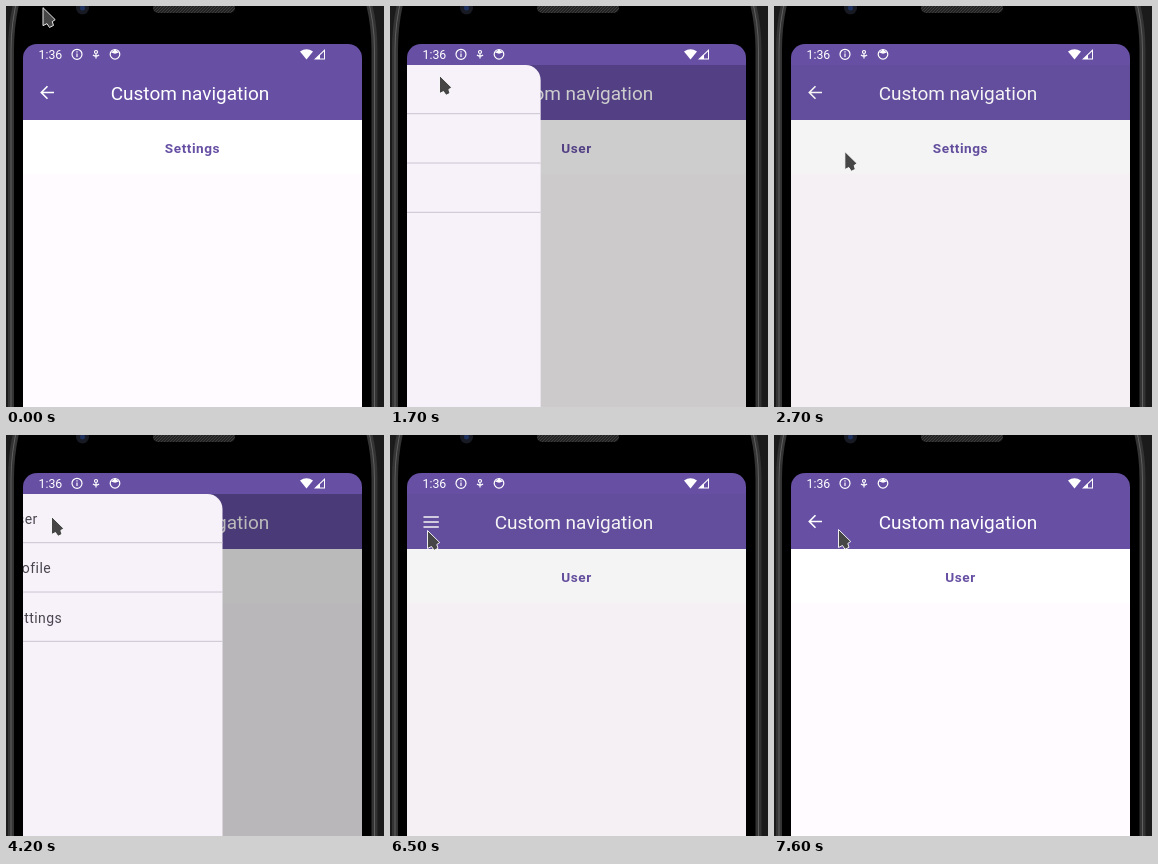
Recreate the animation shown at these times as an HTML page. Size 378 px wide and 401 px high, loop 8000 ms.

```html
<!DOCTYPE html>
<html lang="en">
<head>
<meta charset="utf-8">
<title>Custom navigation</title>
<style>
html, body { margin: 0; width: 100%; height: 100%; overflow: hidden; background: #000; }
svg { display: block; width: 378px; height: 401px; font-family: Roboto, sans-serif; }
</style>
</head>
<body>
<svg viewBox="0 0 378 401" xmlns="http://www.w3.org/2000/svg">
  <defs>
    <clipPath id="screen"><path d="M17 401V52a14 14 0 0 1 14-14H342a14 14 0 0 1 14 14V401Z"/></clipPath>
    <clipPath id="app"><rect x="17" y="59" width="339" height="342"/></clipPath>
    <pattern id="mesh" width="3" height="3" patternUnits="userSpaceOnUse">
      <rect width="3" height="3" fill="#222"/><path d="M0 3L3 0" stroke="#444" stroke-width=".8"/>
    </pattern>
    <path id="edge" d="M5 410V44Q5 16 12-10H361Q368.500 16 368.500 44V410"/>
  </defs>

  <rect width="378" height="401" fill="#1b1b1b"/>
  <use href="#edge" fill="#000" stroke="#343434" stroke-width="6"/>
  <use href="#edge" fill="none" stroke="#606060"/>
  <rect x="147" y="-8" width="82" height="15" rx="5" fill="url(#mesh)"/>
  <circle cx="76.500" cy="2" r="6.500" fill="#171a22"/>
  <circle cx="76.500" cy="2" r="2.500" fill="#1d2f5c"/>

  <g clip-path="url(#screen)">
    <rect x="17" y="38" width="339" height="76" fill="#6750a4"/>
    <rect x="17" y="114" width="339" height="54" fill="#fff"/>
    <rect x="17" y="168" width="339" height="233" fill="#fffbfe"/>

    <g fill="none" stroke="#fff" stroke-width="1.200">
      <text x="32.500" y="53" font-size="12.300" fill="#fff" stroke="none">1:36</text>
      <circle cx="71" cy="48.300" r="5"/>
      <path d="M71 47.500V51M71 45.300V46.500"/>
      <circle cx="90" cy="46" r="1.500"/>
      <path d="M87 49Q90 51.500 93 49M90 48V52.500"/>
      <circle cx="109" cy="48.300" r="4.800"/>
      <path d="M105 46.500L109 43.500L113 46.500L109 47.800Z" fill="#fff" stroke="none"/>
      <path d="M294 45.600Q300.500 40.700 307 45.600L300.500 53.500ZM308 53.500L319 43V53.500Z" fill="#fff" stroke="none"/>
      <path d="M314 52.500V49.300L318 45.500V52.500Z" fill="#6750a4" stroke="none"/>
    </g>

    <text x="184" y="94" font-size="19" fill="#fff" text-anchor="middle">Custom navigation</text>
    <path id="icon" fill="none" stroke="#fff" stroke-width="1.600"/>
    <text id="label" x="186.500" y="146.500" font-size="13.600" font-weight="700" letter-spacing=".55" fill="#6750a4" text-anchor="middle"></text>

    <g clip-path="url(#app)">
      <rect id="scrim" x="17" y="59" width="339" height="342" fill="#000"/>
      <g id="drawer" font-size="14" letter-spacing=".45" fill="#49454f">
        <path d="M0 59H232a15 15 0 0 1 15 15V401H0Z" fill="#f7f2fa"/>
      </g>
    </g>
  </g>

  <path id="cursor" d="M.5 .5V18.500L4.500 16.500L7 20.300L11 18.300L9.800 14.500L12.700 12.500Z" fill="#464646" stroke="#fff" stroke-width=".9" stroke-linejoin="round"/>
</svg>
<script>
const LOOP = 8000, SLIDE = 256, TRAVEL = 297, WIDTH = 247;
const BURGER = [82, 87, 92].map(y => `M33.500 ${y}H48.800`).join("");
const ARROW = "M48 86.500H35.500M41.500 80.300L35.300 86.500L41.500 92.700";
const $ = id => document.getElementById(id);

// each visit: drawer opens, an item is picked, the back button is pressed
const visits = [
  { page: "Settings", open: -1000, pick: -300, back: 900 },
  { page: "Settings", open: 1598, pick: 2551, back: 3500 },
  { page: "Profile", open: 4058, pick: 4931, back: 5700 },
  { page: "User", open: 6449, pick: 7350, back: Infinity }
];

// pointer moves: start, duration, destination
const home = [36.5, 1];
const moves = [
  [0, 600, 36, 90], [1200, 200, 49, 69],
  [1750, 500, 83, 177], [2551, 450, 45, 81],
  [4250, 350, 59, 135], [4931, 450, 37, 95],
  [6600, 600, 64, 94]
];

["User", "Profile", "Settings"].forEach((name, i) => {
  const y = 59 + 49.3 * i;
  $("drawer").innerHTML += `<text x="32" y="${y + 30}">${name}</text>
    <path d="M0 ${y + 48.7}H${WIDTH}" stroke="#cac4d0"/>`;
});

const clamp = v => Math.min(1, Math.max(0, v));

// cubic-bezier(.4, 0, .2, 1)
function ease(x) {
  if (x <= 0 || x >= 1) return clamp(x);
  let lo = 0, hi = 1, s;
  for (let i = 0; i < 20; i++) {
    s = (lo + hi) / 2;
    const bx = 1.2 * s * (1 - s) ** 2 + .6 * s * s * (1 - s) + s ** 3;
    if (bx < x) lo = s; else hi = s;
  }
  return s * s * (3 - 2 * s);
}

function pointer(t) {
  let [x, y] = home;
  for (const [start, span, toX, toY] of moves) {
    const k = clamp((t - start) / span);
    x += (toX - x) * k;
    y += (toY - y) * k;
  }
  return [x, y];
}

function draw(t) {
  const visit = visits.find(v => t >= v.pick && t < v.back);
  $("label").textContent = visit ? visit.page : "User";
  $("icon").setAttribute("d", visit ? ARROW : BURGER);

  let shown = 0;
  for (const v of visits) shown += ease((t - v.open) / SLIDE) - ease((t - v.pick) / SLIDE);
  $("scrim").setAttribute("opacity", .32 * shown);
  $("drawer").setAttribute("transform", `translate(${17 - TRAVEL * (1 - shown)} 0)`);
  $("cursor").setAttribute("transform", `translate(${pointer(t)})`);
}

const start = performance.now();
function tick() {
  draw((performance.now() - start) % LOOP);
  requestAnimationFrame(tick);
}
tick();
</script>
</body>
</html>
```
